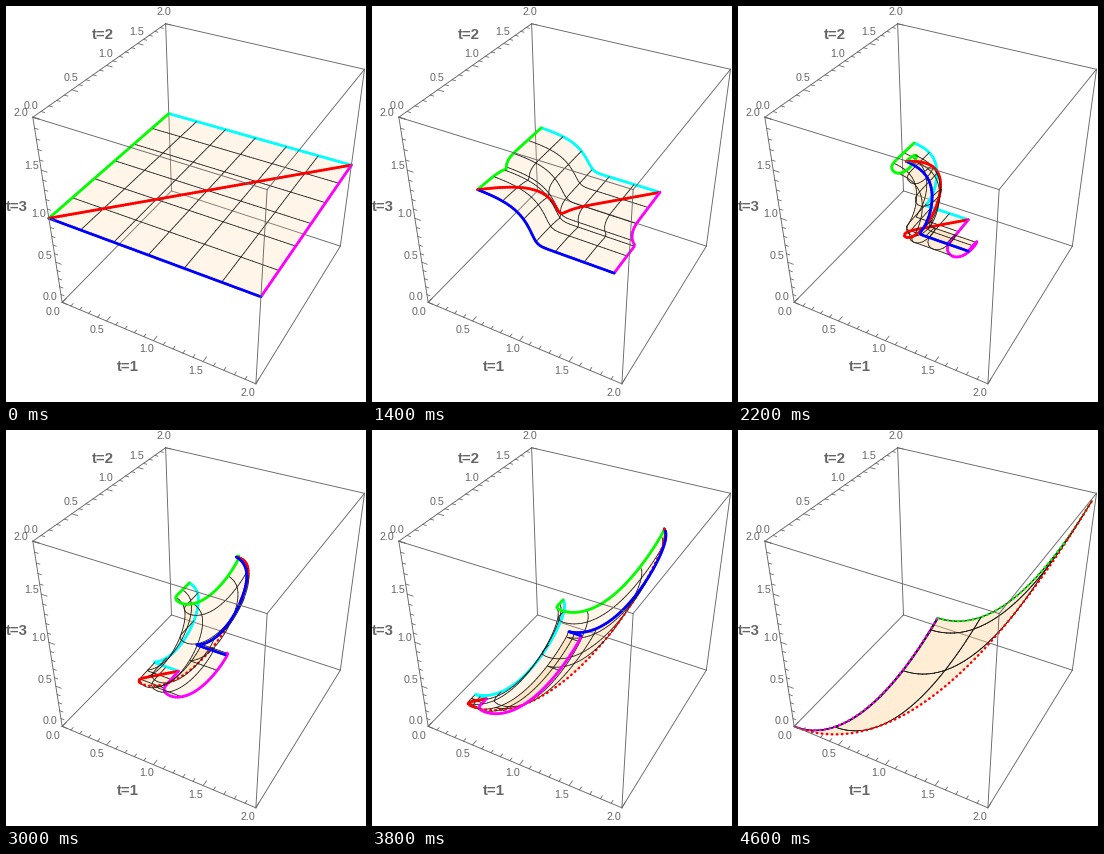
Recreate the animation shown at these times as a matplotlib script. Size 360x396 px, loop 5400 ms.

```python
import itertools
import numpy as np
import matplotlib.pyplot as plt
from matplotlib.animation import FuncAnimation
from matplotlib.collections import LineCollection

W, H, DPI = 360, 396, 100
PX = 72 / DPI
STEPS, HOLD, FRAMES, INTERVAL = 20, 3, 27, 200

# Perspective camera looking at the centre of a unit cube
EYE = np.array([1.3, -2.4, 2.0])
DIST = np.linalg.norm(EYE)
FORWARD = -EYE / DIST
RIGHT = np.cross(FORWARD, [0, 0, 1])
RIGHT /= np.linalg.norm(RIGHT)
UP = np.cross(RIGHT, FORWARD)
SCALE, CX, CY = 753.5, 201.4, 184.4

SURFACE = (1.0, 0.804, 0.549)
LAYER = 0.2
GREY, INK = "#666666", "#1c1c1c"


def project(points):
    """Map box coordinates (0..2) to stage pixels and depth."""
    p = np.asarray(points, float) / 2 - 0.5
    depth = DIST + p @ FORWARD
    x = CX + SCALE * (p @ RIGHT) / depth
    y = CY - SCALE * (p @ UP) / depth
    return np.stack([x, y], -1), depth


def surface(u, v, s):
    """Blend the flat sheet into the two-exponential model manifold."""
    a, b = 10 ** (2 * u - 2), 10 ** (2 * v - 2)
    flat = np.stack([u, v, np.ones_like(u)], -1)
    model = np.stack([np.exp(-a * t) + np.exp(-b * t) for t in (1, 2, 3)], -1)
    return (1 - s) * flat + s * model


def cross(a, b):
    return a[0] * b[1] - a[1] * b[0]


def fill_triangle(layers, a, b, c):
    pts = np.array([a, b, c])
    x0, y0 = np.maximum(np.floor(pts.min(0)).astype(int), 0)
    x1, y1 = np.minimum(np.ceil(pts.max(0)).astype(int), (W, H))
    area = cross(b - a, c - a)
    if x1 <= x0 or y1 <= y0 or abs(area) < 1e-9:
        return
    if area < 0:
        b, c = c, b
    x = np.arange(x0, x1)[None, :] + 0.5
    y = np.arange(y0, y1)[:, None] + 0.5
    inside = True
    for p, q in ((a, b), (b, c), (c, a)):
        inside = inside & ((q[0] - p[0]) * (y - p[1]) - (q[1] - p[1]) * (x - p[0]) > 0)
    layers[y0:y1, x0:x1] += inside


def sheet_image(s, n=36):
    """Translucent sheet: opacity grows with the number of layers."""
    g = np.linspace(0, 2, n + 1)
    u, v = np.meshgrid(g, g, indexing="ij")
    xy, _ = project(surface(u, v, s))
    layers = np.zeros((H, W))
    for i, j in itertools.product(range(n), range(n)):
        a, b, c, d = xy[i, j], xy[i + 1, j], xy[i + 1, j + 1], xy[i, j + 1]
        fill_triangle(layers, a, b, c)
        fill_triangle(layers, a, c, d)
    image = np.empty((H, W, 4))
    image[..., :3] = SURFACE
    image[..., 3] = 1 - (1 - LAYER) ** layers
    return image


def curve(path, s, step):
    """Segments of equal screen length along a path in parameter space."""
    w = np.linspace(0, 2, 400)
    xy, _ = project(surface(*path(w), s))
    arc = np.r_[0, np.cumsum(np.hypot(*np.diff(xy, axis=0).T))]
    count = max(int(arc[-1] / step), 2)
    w = np.interp(np.linspace(0, arc[-1], count + 1), arc, w)
    xy, depth = project(surface(*path(w), s))
    segs = np.stack([xy[:-1], xy[1:]], 1)
    return segs, (depth[:-1] + depth[1:]) / 2, (w[:-1] + w[1:]) / 2


def along_u(v):
    return lambda w: (w, np.full_like(w, v))


def along_v(u):
    return lambda w: (np.full_like(w, u), w)


MESH = [make(k / 3) for k in range(1, 6) for make in (along_u, along_v)]
EDGES = [
    (along_u(0), "#0000ff", 0.010),
    (along_u(2), "#00ffff", 0.010),
    (along_v(0), "#00ff00", 0.012),
    (along_v(2), "#ff00ff", 0.012),
    (lambda w: (w, w), "#ff0000", 0.014),
]


def line_parts(s):
    """All sheet lines as segments ordered from far to near."""
    segs, depths, colors, widths = [], [], [], []

    def add(seg, depth, color, width):
        segs.extend(seg)
        depths.extend(depth)
        colors.extend([color] * len(seg))
        widths.extend([width * PX] * len(seg))

    for path in MESH:
        seg, depth, _ = curve(path, s, 4)
        add(seg, depth - 0.004, INK, 0.8)

    for path, color, lift in EDGES:
        seg, depth, w = curve(path, s, 2.5)
        depth = depth - lift
        if s == 1 and lift == 0.010:
            add(seg, depth, INK, 1.2)
            continue
        dotted = np.zeros(len(w), bool)
        if color == "#ff0000" and s > 0.55:
            dotted = (w > 1.5 * (1 - s)) & ((w < 1.2) | (s == 1))
        elif s == 1:
            dotted[:] = True
        add(seg[~dotted], depth[~dotted], color, 2.7)
        dots = dotted & (np.arange(len(w)) % 2 == 0)
        mid = seg.mean(1, keepdims=True)
        short = mid + (seg - mid) * 0.3
        add(short[dots], depth[dots], color, 2.4)

    order = np.argsort(-np.array(depths), kind="stable")
    return (np.array(segs)[order], [colors[i] for i in order],
            [widths[i] for i in order])


def draw_box(ax):
    corners = list(itertools.product((0, 2), repeat=3))
    for a, b in itertools.combinations(corners, 2):
        if sum(p != q for p, q in zip(a, b)) == 1:
            xy, _ = project([a, b])
            back = (0, 2, 0) in (a, b)
            ax.plot(*xy.T, color=GREY, lw=0.9 * PX, zorder=1 if back else 5)


def draw_ticks(ax, start, axis, inward):
    for k in range(21):
        p = np.array(start, float)
        p[axis] = k / 10
        q = p.copy()
        q[inward] += 0.06 if k % 5 == 0 else 0.035
        xy, _ = project([p, q])
        ax.plot(*xy.T, color=GREY, lw=0.8 * PX, zorder=5)


def draw_labels(ax):
    spots = [
        [(47, 306), (91, 324), (141, 343), (190, 365), (242, 387)],
        [(25, 100), (65, 72), (100, 48), (131, 26), (158, 6)],
        [(44, 291), (39, 250), (33, 208), (26, 160), (15, 107)],
    ]
    for row in spots:
        for k, (x, y) in enumerate(row):
            ax.text(x, y, f"{k / 2:.1f}", size=10.6 * PX, color=GREY, zorder=6,
                    family="Liberation Sans", ha="center", va="center")
    for k, (x, y) in enumerate([(122, 361), (97, 29), (11, 201)], 1):
        ax.text(x, y, f"t={k}", size=15 * PX, color=GREY, weight="bold", zorder=6,
                family="Liberation Sans", ha="center", va="center")


fig = plt.figure(figsize=(W / DPI, H / DPI), dpi=DPI, facecolor="white")
ax = fig.add_axes([0, 0, 1, 1])
ax.axis("off")
draw_box(ax)
draw_ticks(ax, (0, 0, 0), 0, 1)
draw_ticks(ax, (0, 0, 2), 1, 0)
draw_ticks(ax, (0, 0, 0), 2, 0)
draw_labels(ax)

STAGES = [k / STEPS for k in range(STEPS + 1)]
SHEETS = [sheet_image(s) for s in STAGES]
LINES = [line_parts(s) for s in STAGES]

sheet = ax.imshow(SHEETS[0], extent=(0, W, H, 0), interpolation="nearest",
                  aspect="auto", zorder=2)
lines = LineCollection([], capstyle="round", zorder=3)
ax.add_collection(lines)
ax.set_xlim(0, W)
ax.set_ylim(H, 0)


def update(frame):
    k = min(max(frame - HOLD, 0), STEPS)
    segs, colors, widths = LINES[k]
    sheet.set_data(SHEETS[k])
    lines.set_segments(segs)
    lines.set_color(colors)
    lines.set_linewidth(widths)
    return sheet, lines


anim = FuncAnimation(fig, update, frames=FRAMES, interval=INTERVAL,
                     repeat=True, repeat_delay=0)
plt.show()
```
